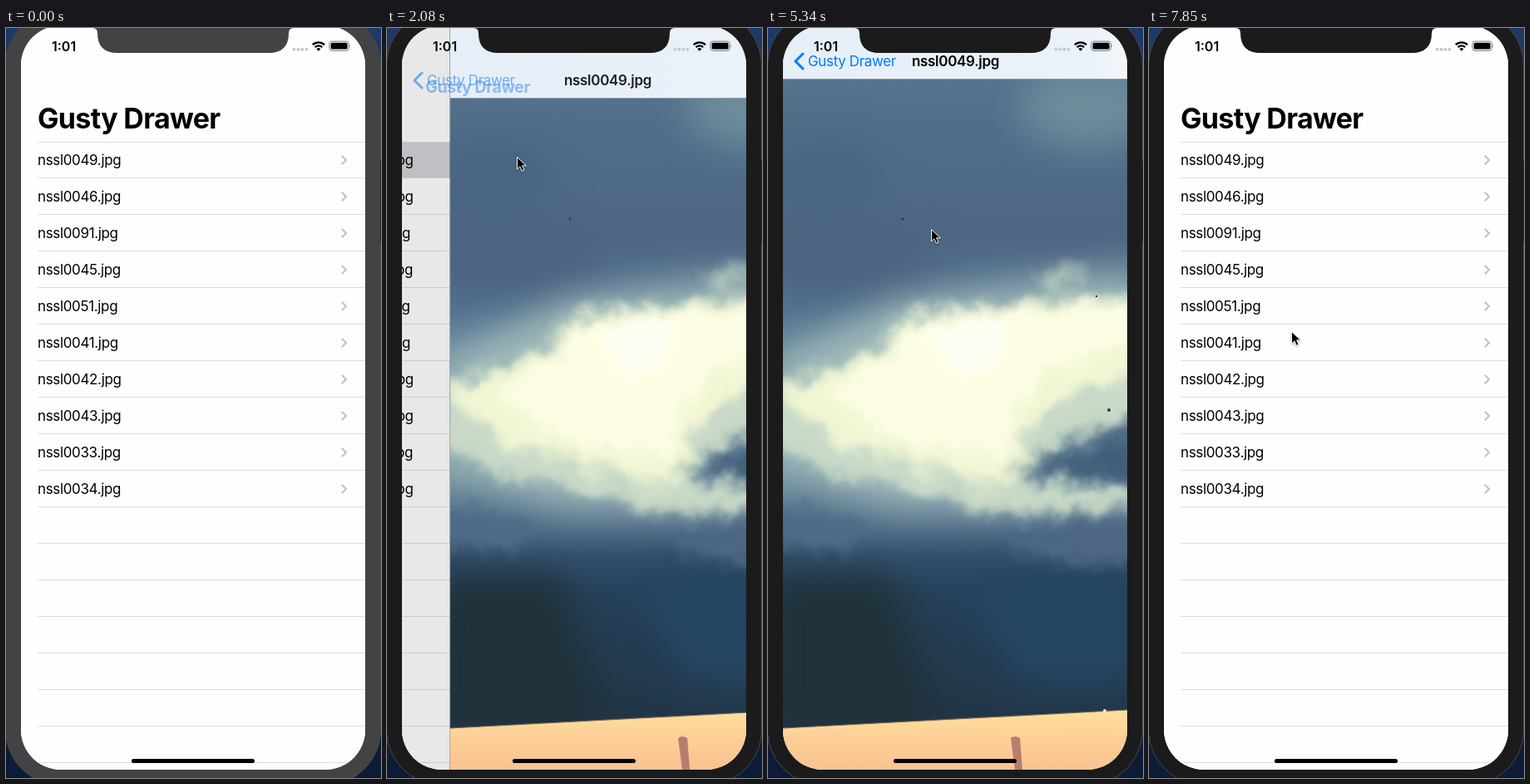
An HTML page for the animation above (8000 ms loop, 451 by 903 pixels).

```html
<!DOCTYPE html>
<html lang="en">
<head>
<meta charset="utf-8">
<title>Photo list</title>
<style>
  html, body { margin: 0; width: 100%; height: 100%; overflow: hidden; }
  body { position: relative; background: linear-gradient(#1d3968, #0c1b36); font: 17px/44px Inter, sans-serif; letter-spacing: -.35px; color: #000; }
  div, span, svg { position: absolute; box-sizing: border-box; white-space: nowrap; }
  .case { left: -1px; top: -22px; width: 452px; height: 934px; border-radius: 67px; background: var(--case); border: 1px solid #4a4a4a; }
  .button { left: 450px; top: 160px; width: 1px; height: 98px; background: #222; }
  .screen { left: 18px; top: -3px; width: 414px; height: 896px; border-radius: 48px; overflow: hidden; background: #fff; }
  .list, .dim, .detail { left: 0; top: 0; width: 414px; height: 896px; }
  .list { background: #fefefe; transform: translateX(calc(var(--p) * -124px)); }
  .row { left: 20px; width: 414px; height: 44px; border-bottom: 1px solid #dededf; }
  .row svg { left: 364px; top: 15px; }
  .topline { left: 20px; top: 140px; width: 414px; height: 1px; background: #dededf; }
  .pick { left: 0; top: 140px; width: 414px; height: 44px; background: #d1d1d6; opacity: var(--hl); }
  .dim { background: #000; opacity: calc(var(--p) * .1); }
  .detail { transform: translateX(calc((1 - var(--p)) * 415px)); will-change: transform; }
  .edge { left: -1px; top: 0; width: 1px; height: 896px; background: #0004; }
  .bar { left: 0; top: 0; width: 414px; height: 88px; background: linear-gradient(90deg, #e6eef7, #ebf2fa 90%, #f2f7f9); border-bottom: 1px solid #8b9dac; transform: translateY(calc(var(--bar) * -1px)); }
  .big { left: 20px; top: 90px; font-size: 34px; font-weight: 700; letter-spacing: -.02em; transform-origin: 0 50%; color: var(--ink);
    transform: translate(calc(var(--q) * 10px), calc(var(--q) * -46px)) scale(calc(1 - .52 * var(--q))); opacity: calc((1 - var(--p)) * 3); }
  .back { left: 0; top: 44px; color: #007aff; opacity: calc((var(--p) - .7) * 3.4); transform: translateY(calc(var(--bar) * -1px)); }
  .back span { left: 30px; }
  .back svg { left: 12px; top: 11px; }
  .name { left: 0; top: 44px; width: 415px; text-align: center; font-weight: 600; letter-spacing: -.3px; opacity: calc(var(--p) * 1.02);
    transform: translate(calc(var(--s) * 1px), calc(var(--bar) * -1px)); }
  .top { left: 0; top: 0; }
  .time { left: 55px; top: 0; font-size: 16px; font-weight: 600; letter-spacing: 0; }
  .home { left: 151px; top: 880px; width: 148px; height: 5px; border-radius: 3px; background: #000; }
  .cursor { left: 0; top: 0; overflow: visible; transform: translate(calc(var(--x) * 1px), calc(var(--y) * 1px)); filter: drop-shadow(0 1px 1px #0006); }
</style>
</head>
<body>
<div class="case"></div>
<div class="button"></div>

<div class="screen">
  <div class="list">
    <div class="pick"></div>
    <div class="topline"></div>
  </div>
  <div class="dim"></div>

  <div class="detail">
    <svg width="414" height="896" viewBox="18 -3 414 896">
      <defs>
        <linearGradient id="sky" x2="0" y2="1">
          <stop offset="0" stop-color="#5a7891"/>
          <stop offset=".14" stop-color="#516e89"/>
          <stop offset=".28" stop-color="#4e6783"/>
          <stop offset=".38" stop-color="#557390"/>
          <stop offset=".5" stop-color="#7394a4"/>
          <stop offset=".6" stop-color="#7896a4"/>
          <stop offset=".67" stop-color="#55718b"/>
          <stop offset=".715" stop-color="#334f6b"/>
          <stop offset=".76" stop-color="#26425b"/>
          <stop offset=".93" stop-color="#223648"/>
        </linearGradient>
        <linearGradient id="sand" x2="0" y2="1">
          <stop offset="0" stop-color="#fee09d"/>
          <stop offset=".45" stop-color="#fdd097"/>
          <stop offset="1" stop-color="#f9c391"/>
        </linearGradient>
        <filter id="wide" x="-30%" y="-30%" width="160%" height="160%" color-interpolation-filters="sRGB">
          <feGaussianBlur stdDeviation="22"/>
        </filter>
        <filter id="puff" x="-20%" y="-20%" width="140%" height="140%" color-interpolation-filters="sRGB">
          <feTurbulence type="fractalNoise" baseFrequency=".03" numOctaves="4" seed="8" result="n"/>
          <feGaussianBlur in="SourceGraphic" stdDeviation="8"/>
          <feDisplacementMap in2="n" scale="34" xChannelSelector="R" yChannelSelector="G"/>
          <feGaussianBlur stdDeviation="1"/>
        </filter>
      </defs>
      <rect x="18" y="-3" width="414" height="896" fill="url(#sky)"/>
      <g filter="url(#wide)">
        <ellipse cx="385" cy="95" rx="85" ry="50" fill="#6d8c9c"/>
        <ellipse cx="70" cy="180" rx="75" ry="50" fill="#4a6582"/>
        <ellipse cx="95" cy="285" rx="110" ry="35" fill="#4a6380"/>
        <path d="M0 400L160 325 450 290V470L330 575 150 575 0 520Z" fill="#9db8b8"/>
        <path d="M0 660H150L210 850H0Z" fill="#20323a"/>
        <path d="M240 655H450V790H300Z" fill="#264562"/>
      </g>
      <g filter="url(#puff)">
        <path d="M320 308Q345 290 388 286 370 302 335 314Z" fill="#c5d7c6"/>
        <path d="M0 432L80 405 135 382 155 342 250 333 450 314V470L345 500 300 548 440 556V580L270 585 170 555 80 540 0 500Z" fill="#c8d9c7"/>
        <path d="M10 440L75 412 140 390 165 350 250 341 450 325V415L370 440 315 470 302 512 288 530 305 552 255 550 190 525 100 510 50 475Z" fill="#f1f6d3"/>
        <path d="M75 440L140 402 172 355 250 347 440 332V375L330 415 300 450 285 510 240 512 150 492Z" fill="#fdfde4"/>
        <path d="M195 365L280 345 285 395 225 425Z" fill="#fdfdf4"/>
        <path d="M306 538Q330 510 450 462V552Q365 536 306 545Z" fill="#4f6d86"/>
        <path d="M330 534Q380 510 450 500V548Q390 535 330 540Z" fill="#405d79"/>
        <path d="M290 612Q350 592 450 608V640Q360 650 290 628Z" fill="#4d6784"/>
        <path d="M15 575Q60 580 125 602L105 628 15 618Z" fill="#4f6b87"/>
      </g>
      <path d="M18 843L432 821V893H18Z" fill="url(#sand)"/>
      <path d="M18 843L432 821" stroke="#71604f" stroke-width="1.2"/>
      <path d="M292 855Q297 851 303 855L306 893H297Z" fill="#b77d6e"/>
      <g fill="#24394c">
        <circle cx="162" cy="230" r="1.4"/>
        <circle cx="410" cy="460" r="2"/>
        <circle cx="395" cy="323" r="1.2"/>
      </g>
      <circle cx="405" cy="822" r="2" fill="#fee9b8"/>
    </svg>
    <div class="bar"></div>
    <div class="edge"></div>
  </div>

  <span class="big">Gusty Drawer</span>
  <div class="back">
    <svg width="16" height="22"><path d="M12 2L3 11 12 20" fill="none" stroke="#007aff" stroke-width="3" stroke-linecap="round" stroke-linejoin="round"/></svg>
    <span>Gusty Drawer</span>
  </div>
  <span class="name">nssl0049.jpg</span>
</div>

<svg class="top" width="451" height="40">
  <path d="M104 0Q110 0 110 6 110 30 134 30H316Q340 30 340 6 340 0 346 0Z" style="fill:var(--case)"/>
  <g fill="#c9c9cb">
    <circle cx="346.4" cy="25.7" r="2"/><circle cx="351.4" cy="25.7" r="2"/><circle cx="356.4" cy="25.7" r="2"/><circle cx="361.4" cy="25.7" r="2"/>
  </g>
  <g fill="none" stroke="#000" stroke-width="2.3">
    <path d="M368.8 20.2A10.3 10.3 0 0 1 383 20.2"/>
    <path d="M371.6 23.2A6.2 6.2 0 0 1 380.2 23.2"/>
  </g>
  <path d="M375.9 27.8L373.4 25.3A3.6 3.6 0 0 1 378.4 25.3Z"/>
  <rect x="388.9" y="16.1" width="23.4" height="11.2" rx="3" fill="none" stroke="#777"/>
  <rect x="390.6" y="17.8" width="20" height="7.8" rx="1.6"/>
  <path d="M413.5 20Q415 21.7 413.5 23.4Z" fill="#777"/>
</svg>
<span class="time">1:01</span>
<div class="home"></div>

<svg class="cursor" width="14" height="20">
  <path d="M.5 .5V15L3.9 11.8 6.3 17.3 9 16.1 6.7 10.8H11.4Z" fill="#000" stroke="#fff" stroke-linejoin="round"/>
</svg>

<script>
  const LOOP = 8000, TICK = 148;
  const root = document.documentElement.style;

  // Tracks are [tick, value] pairs, linear in between.
  const tracks = {
    p: [[12, 0], [13, .464], [14, .86], [15, .98], [16, 1], [41, 1], [42, .85], [43, .237], [44, .04], [45, 0]],
    q: [[12, 0], [13, .4], [14, .82], [15, .98], [16, 1], [41, 1], [42, .85], [43, .275], [44, .05], [45, 0]],
    s: [[12, 235], [13, 149], [14, 40], [15, 5], [16, 0], [41, 0], [42, 45], [43, 181], [44, 225]],
    hl: [[11, 0], [12, 1], [41, 1], [43, .27], [45, 0]],
    bar: [[26, 0], [27, 25], [28, 75], [29, 89], [35, 89], [36, 23], [37, 3], [38, 0]],
    x: [[5, 324], [6, 262], [7, 190], [8, 158], [9, 156], [17, 156], [19, 166], [20, 187], [21, 194], [22, 196], [38, 196], [41, 98], [42, 91], [45, 91], [50, 148], [51, 171]],
    y: [[5, 270], [6, 212], [7, 165], [8, 151], [9, 155], [17, 155], [19, 191], [20, 227], [21, 239], [22, 243], [23, 242], [38, 242], [41, 78], [42, 66], [45, 66], [50, 297], [51, 356], [52, 356], [53, 365]]
  };

  // Title colour by its progress from heading to back button.
  const ink = [
    [[0, 0], [.275, 58], [.4, 70], [1, 0]],
    [[0, 0], [.275, 74], [.4, 103], [1, 122]],
    [[0, 0], [.275, 92], [.4, 144], [1, 255]]
  ];

  function at(keys, t) {
    const i = keys.findIndex(k => k[0] > t);
    if (i === 0) return keys[0][1];
    if (i < 0) return keys[keys.length - 1][1];
    const [a, u] = keys[i - 1], [b, v] = keys[i];
    return u + (v - u) * (t - a) / (b - a);
  }

  const names = [49, 46, 91, 45, 51, 41, 42, 43, 33, 34];
  const arrow = '<svg width="10" height="14"><path d="M1.8 1.8L7 7 1.8 12.2" fill="none" stroke="#c2c2c5" stroke-width="2"/></svg>';
  const list = document.querySelector('.list');
  for (let i = 0; i < 17; i++) {
    const row = document.createElement('div');
    row.className = 'row';
    row.style.top = 140 + 44 * i + 'px';
    if (i < names.length) row.innerHTML = `nssl00${names[i]}.jpg${arrow}`;
    list.append(row);
  }

  const cursor = document.querySelector('.cursor');
  let last = -1;

  function draw(tick) {
    for (const key in tracks) root.setProperty('--' + key, at(tracks[key], tick));
    const q = at(tracks.q, tick);
    root.setProperty('--ink', `rgb(${ink.map(c => Math.round(at(c, q)))})`);
    root.setProperty('--case', tick < 12 ? '#434343' : '#1b1b1b');
    cursor.style.visibility = tick < 5 ? 'hidden' : 'visible';
  }

  function frame() {
    const tick = Math.floor((performance.now() % LOOP + 10) / TICK);
    if (tick !== last) draw(last = tick);
    requestAnimationFrame(frame);
  }
  frame();
</script>
</body>
</html>
```
